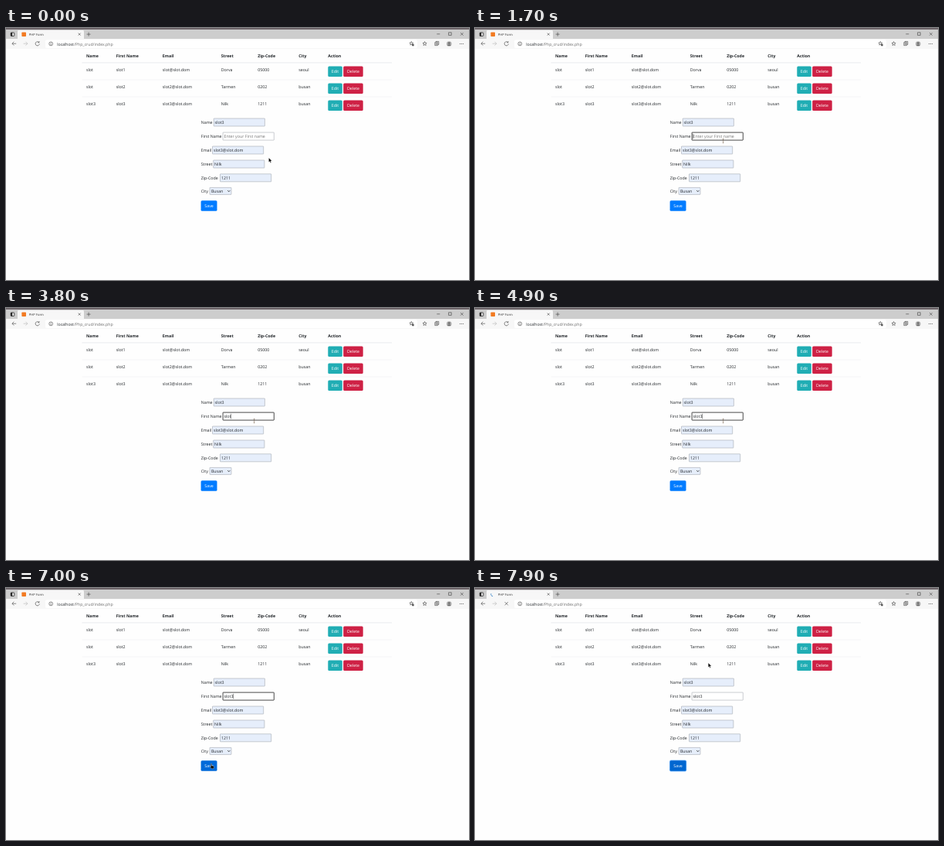
Recreate the animation shown at these times as an HTML page. Size 600 by 326 pixels, loop 8 s.

```html
<!DOCTYPE html>
<html lang="en">
<head>
<meta charset="utf-8">
<title>PHP Form</title>
<style>
  html, body { margin: 0; width: 100%; height: 100%; overflow: hidden; background: #fefefe; }
  svg { display: block; width: 600px; height: 326px; }
  text { font: 5.3px "Open Sans", "Noto Sans", sans-serif; fill: #212529; text-rendering: geometricPrecision; white-space: pre; }
  .bold { font-weight: 700; }
  .tab { font-size: 4.1px; fill: #333; }
  .url { font-size: 5.2px; }
  .white { fill: #fff; }
  .mid { text-anchor: middle; }
  .grey { fill: #757575; }
  .icon { fill: none; stroke: #3c3c3c; stroke-width: .6; }
  .faint { stroke: #b4b4b4; }
  .field { stroke: #949aa3; stroke-width: .5; }
  .focus { stroke: #1c1c1c; stroke-width: .8; }
</style>
</head>
<body>
<svg id="stage" viewBox="0 0 600 326"></svg>
<script>
const LOOP = 8000;
const stage = document.getElementById('stage');

const text = (x, y, s, cls = '', id = '') =>
  `<text x="${x}" y="${y}" class="${cls}" id="${id}">${s}</text>`;
const rect = (x, y, w, h, fill, rx = 0, extra = '') =>
  `<rect x="${x}" y="${y}" width="${w}" height="${h}" fill="${fill}" rx="${rx}" ${extra}/>`;
const icon = (d, extra = '') => `<path class="icon" d="${d}" ${extra}/>`;

// Browser window
function chrome() {
  return rect(0, 0, 600, 14.5, '#cdcdcd') + rect(0, 0, 600, 2, '#6e666a') +
    rect(0, 14, 600, 13, '#f7f7f7') +
    '<path d="M15 14.5V4.4q0-1.4 1.4-1.4H99.6q1.4 0 1.4 1.4V14.5z" fill="#f7f7f7"/>' +
    rect(51, 15.2, 482, 10.8, '#fff', 2) +
    rect(6.2, 6, 4.6, 4.4, '#eee', .8, 'stroke="#222" stroke-width=".8"') + rect(6.2, 6, 2, 4.4, '#222') +
    rect(20.4, 5.4, 5.6, 5.6, '#f27b22', .8, 'id="favicon"') +
    icon('M21 6.3v3.6', 'id="wait" style="stroke:#c4545c"') +
    icon('M23.1 5.8a2.4 2.4 0 0 1 2.2 3.4', 'id="spinner" style="stroke:#3b86c8;stroke-width:.9"') +
    text(29.8, 9.7, 'PHP Form', 'tab', 'tabTitle') +
    icon('M93.7 6.6l3 3m0-3l-3 3M104.6 8.1h5M107.1 5.6v5') +
    icon('M558.3 7.8h4M573.6 5.8h3.6v3.6h-3.6zM589 6l3.6 3.6m0-3.6L589 9.6') +
    icon('M13.2 20.2H8m2.3-2.4L7.9 20.2l2.4 2.4') +
    '<path class="icon faint" d="M22.6 20.2h5.2m-2.3-2.4l2.4 2.4-2.4 2.4"/>' +
    icon('M42.6 18.5a2.6 2.6 0 1 0 .7 2M43 17v1.8h-1.9', 'id="reload"') +
    icon('M38.6 18.1l4.2 4.2m0-4.2l-4.2 4.2', 'id="stop"') +
    '<circle class="icon" cx="58.2" cy="20.4" r="2.4"/>' + icon('M58.2 20v1.8M58.2 18.9v.6') +
    text(66.2, 22.5, 'localhost<tspan fill="#6a6a6a">/Php_crud/index.php</tspan>', 'url') +
    icon(star(525.3, 20, 2.5)) + '<circle cx="527.4" cy="22" r="1.4" fill="#555"/>' +
    icon(star(542.6, 20.3, 2.7)) +
    icon('M555.8 18.6h3.6v4h-3.6zM557 18.4v-1h3.8v4h-1.2M557.6 19.5v2.2M556.5 20.6h2.2') +
    '<circle cx="574.2" cy="20.4" r="3.2" fill="#a9a9a9"/><circle cx="574.2" cy="19.5" r="1.1" fill="#555"/>' +
    '<path d="M572 22.7q2.2-3 4.4 0z" fill="#555"/>' +
    [588.3, 590.3, 592.3].map(x => `<circle cx="${x}" cy="20.4" r=".5" fill="#333"/>`).join('');
}

function star(cx, cy, r) {
  const pts = Array.from({ length: 10 }, (_, i) => {
    const a = i * Math.PI / 5 - Math.PI / 2, k = i % 2 ? r * .45 : r;
    return (cx + k * Math.cos(a)).toFixed(2) + ' ' + (cy + k * Math.sin(a)).toFixed(2);
  });
  return 'M' + pts.join('L') + 'z';
}

// Records table
const COLS = [104, 142.7, 202.8, 278.7, 326.2, 379.2, 417.3];
const HEAD = ['Name', 'First Name', 'Email', 'Street', 'Zip-Code', 'City', 'Action'];
const ROWS = [
  ['slot', 'slot1', 'slot@slot.dom', 'Dorva', '05000', 'seoul'],
  ['slot', 'slot2', 'slot2@slot.dom', 'Tarmen', '0202', 'busan'],
  ['slot3', 'slot3', 'slot3@slot.dom', 'Nilk', '1211', 'busan'],
];

function table() {
  let out = HEAD.map((s, i) => text(COLS[i], 38.4, s, 'bold')).join('') +
    rect(98.5, 44.6, 401.5, .7, '#dee2e6');
  ROWS.forEach((row, r) => {
    const y = 45 + r * 22;
    if (r) out += rect(98.5, y - .2, 401.5, .4, '#e3e6ea');
    out += row.map((s, i) => text(COLS[i], y + 11, s)).join('') +
      rect(417.3, y + 4.6, 18.5, 13.4, '#20adb4', 1.5) + text(426.5, y + 13.4, 'Edit', 'white mid') +
      rect(437.2, y + 4.6, 25.5, 13.4, '#ce2145', 1.5) + text(450, y + 13.4, 'Delete', 'white mid');
  });
  return out;
}

// Form: label, input x, input y, value
const FIELDS = [
  ['Name', 269.2, 117, 'slot3'],
  ['First Name', 281.1, 135.1, ''],
  ['Email', 267.5, 153, 'slot3@slot.dom'],
  ['Street', 268.7, 171, 'Nilk'],
  ['Zip-Code', 277.5, 188.8, '1211'],
];
const FIELD_W = 66.2, FIELD_H = 10;

function form() {
  return FIELDS.map(([label, x, y, value]) =>
    text(252.7, y + 7.3, label) +
    rect(x, y, FIELD_W, FIELD_H, value ? '#e6eefb' : '#fff', .4, `class="field" ${value ? '' : 'id="first"'}`) +
    text(x + 1.4, y + 7.2, value, '', value ? '' : 'typed')).join('') +
    rect(252, 222.5, 22.2, 15, '#80bdff', 2, 'id="ring"') +
    rect(252.6, 223.2, 20.9, 13.6, '#007bff', 1.5, 'id="save"') +
    text(263.1, 232.3, 'Save', 'white mid') +
    text(252.7, 213, 'City') +
    rect(264, 206.4, 28, 9, '#e6eefb', .4, 'class="field"') +
    text(265.9, 212.9, 'Busan') + icon('M287.3 210.2l1.5 1.5 1.5-1.5', 'style="stroke:#111;stroke-width:.8"') +
    rect(0, 136.8, .45, 6.6, '#111', 0, 'id="caret"');
}

function pointers() {
  return '<g id="pointer">' +
    '<path id="arrow" d="M0 0V5.6L1.3 4.4 2.2 6.4 3.1 6 2.2 4H4z" fill="#000" stroke="#fff" stroke-width=".25"/>' +
    '<path id="beam" d="M-.7-2.7H.7M0-2.7V2.7M-.7 2.7H.7" fill="none" stroke="#75604a" stroke-width=".6"/>' +
    '<path id="hand" d="M-.4 0q.6-.7 1.2 0V2.3l2.3.5q.8.3.7 1.2L3.3 6.3H.5L-1.6 3.8q.1-.9 1.2-.2z" fill="#111" stroke="#fff" stroke-width=".3"/>' +
    '</g>';
}

stage.innerHTML = rect(0, 0, 600, 326, '#fefefe') + chrome() + table() + form() + pointers();
const el = id => document.getElementById(id);
const show = (id, on) => el(id).setAttribute('visibility', on ? 'visible' : 'hidden');

// time, x, y
const PATH = [
  [100, 340.5, 168], [900, 321.6, 146], [5700, 321.6, 146],
  [6250, 296.2, 235.2], [6400, 296.2, 235.2], [6800, 265.8, 227.4],
  [7450, 265.8, 227.4], [7800, 302.3, 97],
];
const KEYS = [1900, 2100, 2350, 2600, 4800];
const FOCUS = 1400, CLICK = 7100, REPLY = 7700;

function pointerAt(t) {
  const i = PATH.findIndex(p => p[0] > t);
  if (i === 0) return PATH[0].slice(1);
  if (i < 0) return PATH[PATH.length - 1].slice(1);
  const [t0, x0, y0] = PATH[i - 1], [t1, x1, y1] = PATH[i];
  const u = (t - t0) / (t1 - t0), e = u * u * (3 - 2 * u);
  return [x0 + (x1 - x0) * e, y0 + (y1 - y0) * e];
}

const inside = (px, py, x, y, w, h) => px >= x && px <= x + w && py >= y && py <= y + h;

function draw(t) {
  const [x, y] = pointerAt(t);
  const onField = FIELDS.some(f => inside(x, y, f[1], f[2], FIELD_W, FIELD_H + 1));
  const onSave = inside(x, y, 252.6, 223, 21, 14);
  el('pointer').setAttribute('transform', `translate(${x} ${y})`);
  show('beam', onField);
  show('hand', onSave);
  show('arrow', !onField && !onSave);

  const count = KEYS.filter(k => k <= t).length;
  const typed = el('typed');
  typed.textContent = count ? 'slot3'.slice(0, count) : 'Enter your First name';
  typed.setAttribute('class', count ? '' : 'grey');

  const focused = t >= FOCUS && t < CLICK;
  el('first').setAttribute('class', focused ? 'focus' : 'field');
  const since = t - (count ? KEYS[count - 1] : FOCUS);
  show('caret', focused && since % 1000 < 500);
  el('caret').setAttribute('x', 282.5 + (count ? typed.getComputedTextLength() : 0));

  const clicked = t >= CLICK, replied = t >= REPLY;
  show('ring', clicked);
  el('save').setAttribute('fill', clicked ? '#0066d0' : onSave ? '#0069d9' : '#007bff');
  show('favicon', !clicked);
  show('wait', clicked && !replied);
  show('spinner', replied);
  el('spinner').setAttribute('transform', `rotate(${(t - 7900) * .36 + 180} 23.1 8.2)`);
  show('reload', !clicked);
  show('stop', clicked);
  el('tabTitle').textContent = clicked && !replied ? 'localhost/Php_crud/index.php' : 'PHP Form';
}

const start = performance.now();
function tick() {
  draw((performance.now() - start) % LOOP);
  requestAnimationFrame(tick);
}
tick();
</script>
</body>
</html>
```
